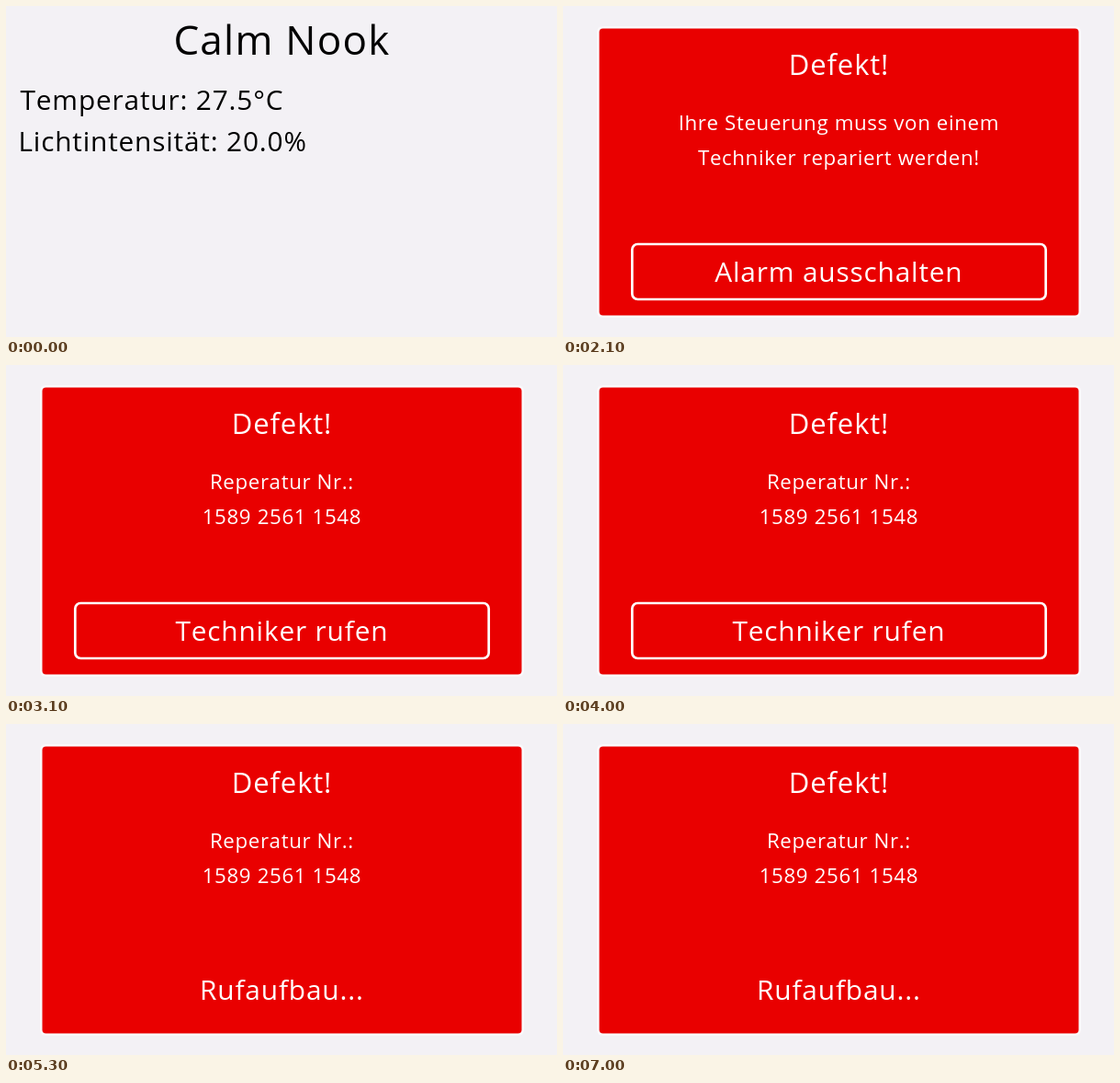
Write an HTML page that moves like this. It is 600 px wide and 360 px high and loops after 7100 ms.

```html
<!DOCTYPE html>
<html lang="de">
<head>
<meta charset="utf-8">
<title>Haussteuerung</title>
<style>
  html, body { margin: 0; width: 100%; height: 100%; overflow: hidden; background: #f3f1f5; }
  svg {
    display: block; width: 600px; height: 360px;
    font-family: "Open Sans", "Noto Sans", sans-serif;
    font-kerning: none;
  }
  text { letter-spacing: .028em; }
  .title { font-size: 44px; }
  .reading, .action { font-size: 29.8px; }
  .head { font-size: 31px; }
  .body { font-size: 22.3px; }
  .mid { text-anchor: middle; }
  #alarm { fill: #fff; }
</style>
</head>
<body>
<svg viewBox="0 0 600 360">
  <g id="home">
    <text class="title mid" x="300.5" y="53">Calm Nook</text>
    <text class="reading" x="15.5" y="112.5">Temperatur: 27.5°C</text>
    <text class="reading" x="13.5" y="157.5">Lichtintensität: 20.0%</text>
  </g>
  <g id="alarm">
    <rect x="37" y="22" width="527" height="317" rx="6" fill="#faf9fb"/>
    <rect x="39.5" y="24.5" width="522" height="312" rx="4" fill="#e90000"/>
    <text class="head mid" x="300.5" y="75">Defekt!</text>
    <text class="body mid" x="300.4" y="135" id="line1"></text>
    <text class="body mid" x="300.4" y="172.5" id="line2"></text>
    <rect id="button" x="75.3" y="259" width="450.4" height="60" rx="6" fill="none" stroke="#fff" stroke-width="2.7"/>
    <text class="action mid" x="300.4" y="300" id="action"></text>
    <g id="cursor" transform="translate(308.5 300.5)">
      <path d="M0 -7L7.5 0L0 7L-7.5 0Z" fill="#50201f"/>
      <path d="M0 -3.5L3.5 0L0 3.5L-3.5 0Z" fill="#e8f0ee"/>
    </g>
  </g>
</svg>
<script>
  const LOOP = 7100;
  const notice = ["Ihre Steuerung muss von einem", "Techniker repariert werden!"];
  const ticket = ["Reperatur Nr.:", "1589 2561 1548"];
  const steps = [
    { at: 0 },
    { at: 1500, lines: notice, action: "Alarm ausschalten", button: true },
    { at: 2600, lines: notice, action: "Alarm ausschalten", button: true, cursor: true },
    { at: 2900, lines: ticket, action: "Techniker rufen", button: true },
    { at: 5100, lines: ticket, action: "Rufaufbau..." }
  ];

  const $ = id => document.getElementById(id);
  const show = (id, on) => $(id).setAttribute("display", on ? "inline" : "none");
  const start = performance.now();
  let current;

  function apply({ lines, action = "", button, cursor }) {
    show("home", !lines);
    show("alarm", lines);
    show("button", button);
    show("cursor", cursor);
    [$("line1").textContent, $("line2").textContent] = lines || ["", ""];
    $("action").textContent = action;
  }

  function draw(now) {
    const t = Math.max(0, now - start) % LOOP;
    const step = steps.findLast(s => t >= s.at);
    if (step !== current) apply(current = step);
    requestAnimationFrame(draw);
  }
  draw(start);
</script>
</body>
</html>
```
